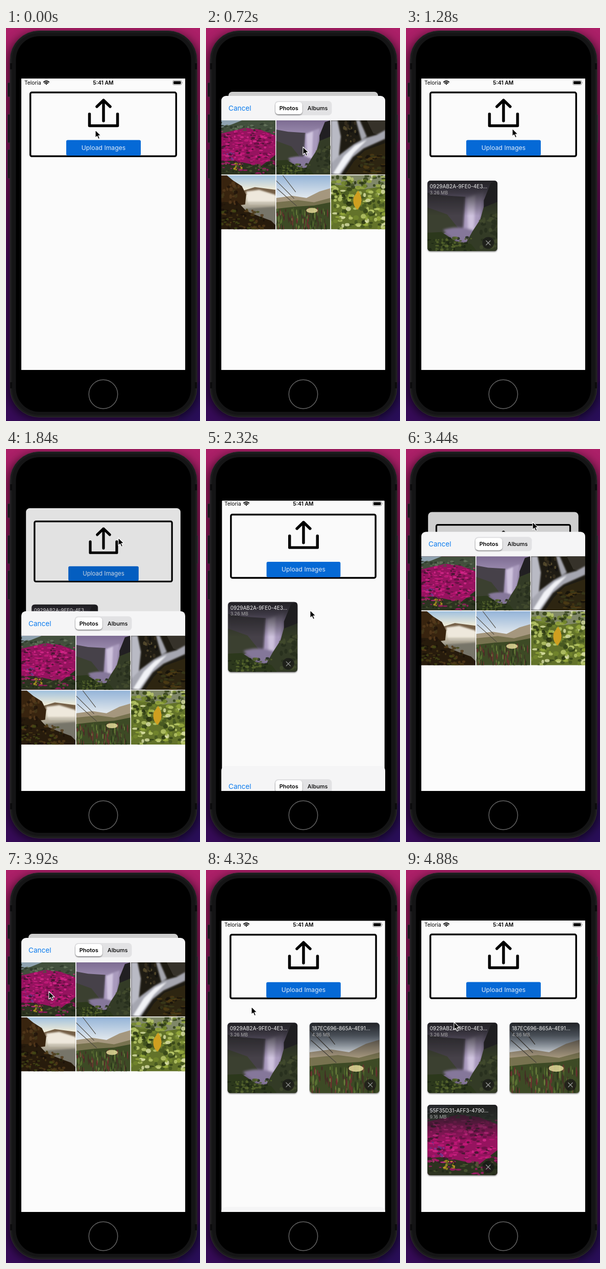
An HTML page that plays this animation: 380 by 770 pixels, repeating every 4960 ms.

```html
<!DOCTYPE html>
<html lang="en">
<head>
<meta charset="utf-8">
<title>Image upload</title>
<style>
  html, body { margin: 0; width: 100%; height: 100%; overflow: hidden; background: #000; }
  svg { display: block; }
  text { font-family: Inter, Roboto, sans-serif; }
  .mid { text-anchor: middle; }
  .line { fill: none; stroke: #000; stroke-linecap: round; stroke-linejoin: round; }
</style>
</head>
<body>
<svg id="stage" width="380" height="770" viewBox="0 0 380 770">
  <defs>
    <linearGradient id="wall" x2="0" y2="1">
      <stop offset="0" stop-color="#ac2068"/>
      <stop offset=".2" stop-color="#98195f"/>
      <stop offset=".42" stop-color="#700f5c"/>
      <stop offset=".6" stop-color="#4b0a62"/>
      <stop offset="1" stop-color="#360b58"/>
    </linearGradient>
    <linearGradient id="shade" x2="0" y2="1">
      <stop offset="0" stop-color="#1d1d1f" stop-opacity=".95"/>
      <stop offset=".18" stop-color="#1d1d1f" stop-opacity=".72"/>
      <stop offset=".5" stop-color="#1d1d1f" stop-opacity="0"/>
    </linearGradient>
    <linearGradient id="sky" x2="0" y2="1">
      <stop offset="0" stop-color="#94b4d8"/>
      <stop offset=".4" stop-color="#dfe6ec"/>
    </linearGradient>
    <linearGradient id="haze" x2="0" y2="1">
      <stop offset="0" stop-color="#9fc0de"/>
      <stop offset=".25" stop-color="#ecead9"/>
      <stop offset=".5" stop-color="#c0b8a4"/>
      <stop offset=".75" stop-color="#77746a"/>
    </linearGradient>
    <linearGradient id="dusk" x2="0" y2="1">
      <stop offset="0" stop-color="#7d6c92"/>
      <stop offset=".2" stop-color="#9484a8"/>
      <stop offset="1" stop-color="#5a5166"/>
    </linearGradient>
    <filter id="soft"><feGaussianBlur stdDeviation="1.5"/></filter>
    <filter id="glow" x="-20%" y="-10%" width="140%" height="120%"><feGaussianBlur stdDeviation="10"/></filter>
    <filter id="drop" x="-10%" y="-10%" width="120%" height="125%">
      <feDropShadow dx="0" dy="1.5" stdDeviation="1.3" flood-opacity=".5"/>
    </filter>
    <clipPath id="screen"><rect x="30" y="99" width="321" height="571"/></clipPath>
    <clipPath id="cardClip"><rect width="137" height="138" rx="6"/></clipPath>

    <symbol id="blooms" viewBox="0 0 100 100">
      <rect width="100" height="100" fill="#96135f"/>
      <path d="M0 0H100V28L72 17 45 14 22 19 0 24Z" fill="#414f3c"/>
      <path d="M0 0H38L18 8 0 13Z" fill="#8fa2b0"/>
      <path d="M0 76L22 74 50 80 74 84 100 64V100H0Z" fill="#2c3320"/>
    </symbol>
    <symbol id="falls" viewBox="0 0 100 100">
      <rect width="100" height="100" fill="url(#dusk)"/>
      <path d="M0 17L22 21 54 23 52 72 0 72Z" fill="#464149"/>
      <path d="M0 38L28 48 44 68 0 82Z" fill="#3b4030"/>
      <g filter="url(#soft)">
        <path d="M54 24L80 15 76 50 68 80H50Z" fill="#a99abd"/>
        <path d="M56 25L68 20 66 70 58 80Z" fill="#cfc3de"/>
        <path d="M22 70Q45 62 70 72L60 90Q35 86 22 70Z" fill="#85779a"/>
      </g>
      <path d="M100 8L90 20 80 37 75 55 64 72 55 88 58 100H100Z" fill="#333b26"/>
      <path d="M100 0L90 3 80 28 80 38 100 30Z" fill="#211f22"/>
      <path d="M0 74L20 73 40 86 62 90 70 100H0Z" fill="#2c381c"/>
    </symbol>
    <symbol id="rapids" viewBox="0 0 100 100">
      <rect width="100" height="100" fill="#1e1b13"/>
      <path d="M66 0H100V30L78 24Z" fill="#36322a"/>
      <g filter="url(#soft)">
        <path d="M0 0H12L18 30 14 70 0 82Z" fill="#b9bac4"/>
        <path d="M100 18L84 27 62 33 42 44 18 62 0 80V100H18L40 68 60 52 100 34Z" fill="#a5a6b0"/>
        <path d="M66 36L44 47 24 66 4 98 14 100 42 60Z" fill="#f1f2f6"/>
        <path d="M46 0L53 0 66 30 56 36Z" fill="#a4a5ae"/>
      </g>
      <path d="M42 76L62 56 100 42V100H26Z" fill="#2d2511"/>
    </symbol>
    <symbol id="basin" viewBox="0 0 100 100">
      <rect width="100" height="100" fill="url(#haze)"/>
      <path d="M42 28L62 22 100 27V38L46 36Z" fill="#756047"/>
      <g filter="url(#soft)">
        <path d="M46 30L70 27 100 36V49H48Z" fill="#eee8dc"/>
        <path d="M48 50H100V54H52Z" fill="#c8c2b4"/>
        <path d="M42 62L100 58V82L60 76Z" fill="#777469"/>
      </g>
      <path d="M0 0H10L22 10 38 20 46 36 44 54 0 60Z" fill="#38240f"/>
      <path d="M0 49L32 51 46 66 70 76 92 84 100 92V100H0Z" fill="#271b0c"/>
    </symbol>
    <symbol id="dunes" viewBox="0 0 100 100">
      <rect width="100" height="100" fill="url(#sky)"/>
      <path d="M0 42L30 38 56 42 80 30 100 24V70H0Z" fill="#a5977e"/>
      <path d="M0 50L40 46 70 50 100 42V70H0Z" fill="#77724f"/>
      <path d="M0 62L35 58 70 56 100 50V100H0Z" fill="#3d4a25"/>
      <path d="M0 10L33 43M2 25L38 57M12 0L36 31" stroke="#4c483f" fill="none"/>
    </symbol>
    <symbol id="leaves" viewBox="0 0 100 100">
      <rect width="100" height="100" fill="#63732a"/>
      <path d="M0 0H100V20L60 26 0 16Z" fill="#808868"/>
    </symbol>
  </defs>

  <rect width="380" height="770" fill="url(#wall)"/>
  <path d="M380 690V770H335Z" fill="#19125a" opacity=".45"/>
  <rect x="6" y="12" width="370" height="752" rx="54" opacity=".75" filter="url(#glow)"/>
  <g fill="#17131a" stroke="#38303a">
    <rect x="3.5" y="107" width="8" height="28" rx="2"/>
    <rect x="3.5" y="169" width="8" height="56" rx="2"/>
    <rect x="3.5" y="238" width="8" height="57" rx="2"/>
    <rect x="367" y="169" width="8.5" height="56" rx="2"/>
  </g>
  <rect x="8" y="5.5" width="366" height="757" rx="57" fill="#1b1b1c" stroke="#302c30"/>
  <path d="M8 75H14M368 75H374M8 700H14M368 700H374" stroke="#0c0c0d" stroke-width="12"/>
  <rect x="12" y="10" width="358" height="748" rx="52" fill="#141415"/>
  <rect x="19.5" y="16" width="343" height="736" rx="46" fill="#000"/>
  <circle cx="190.5" cy="717.5" r="28.2" fill="none" stroke="#636363" stroke-width="1.5"/>

  <g clip-path="url(#screen)">
    <g id="home">
      <rect id="page" x="30" y="99" width="321" height="571" fill="#fbfbfb"/>
      <rect class="line" x="47.7" y="126.3" width="285.6" height="125" rx="3" stroke-width="3.5"/>
      <path class="line" d="M191 182V141.500M178 154L191 141.500 204 154M163.500 168.500V191.500H218.500V168.500" stroke-width="5.5"/>
      <rect x="118" y="219.5" width="146" height="30.5" rx="3" fill="#0569d6"/>
      <text class="mid" x="191" y="239" font-size="12.2" fill="#e3edf9">Upload Images</text>
      <g id="cards"></g>
      <rect id="dim" x="29" y="98" width="323" height="573" opacity="0"/>
    </g>
    <g id="status">
      <text x="36" y="111" font-size="10.3">Teloria</text>
      <text class="mid" x="190.5" y="111.3" font-size="10.4" font-weight="600">5:41 AM</text>
      <g class="line" stroke-width="1.9" style="stroke-linecap:butt">
        <path d="M73.300 106.200Q79 101.200 84.700 106.200M75.300 108.500Q79 105.300 82.700 108.500"/>
        <path d="M77.200 109.500L79 108.400 80.800 109.500 79 111.400Z" fill="#000" stroke="none"/>
      </g>
      <rect x="326.5" y="102.8" width="17.5" height="8.6" rx="2.5" fill="none" stroke="#909090"/>
      <rect x="328" y="104.3" width="14.5" height="5.6" rx="1.3"/>
      <path d="M345.300 105.500Q347 107 345.300 108.700Z" fill="#909090"/>
    </g>
    <g id="sheet">
      <rect x="30" width="321" height="620" rx="9" fill="#f5f5f6"/>
      <g id="content">
        <rect x="30" y="48" width="321" height="560" fill="#fcfcfc"/>
        <text x="44" y="29" font-size="13.6" fill="#0b7bee">Cancel</text>
        <rect x="134.5" y="10" width="112" height="28" rx="7" fill="#e2e2e4"/>
        <rect x="136" y="12" width="52.5" height="24" rx="6" fill="#fff" filter="url(#drop)"/>
        <text class="mid" x="162.3" y="28" font-size="11" font-weight="600">Photos</text>
        <text class="mid" x="218.7" y="28" font-size="11" font-weight="500">Albums</text>
        <g id="grid"></g>
      </g>
    </g>
  </g>
  <path id="cursor" d="M0 0V15L3.500 11.800 6 17.500 8.500 16.400 6.100 10.900H11Z" fill="#000" stroke="#fff" stroke-width="1.1" stroke-linejoin="round"/>
</svg>

<script>
const NS = 'http://www.w3.org/2000/svg';
const $ = id => document.getElementById(id);
function add(parent, tag, attrs, text) {
  const node = document.createElementNS(NS, tag);
  for (const key in attrs) node.setAttribute(key, attrs[key]);
  if (text) node.textContent = text;
  return parent.appendChild(node);
}

// Seeded dabs of colour inside a box
let seed = 11;
const rand = () => (seed = seed * 16807 % 2147483647) / 2147483647;
function dabs(photo, count, [x, y, w, h], [rx, ry], colours) {
  for (let i = 0; i < count; i++) {
    add($(photo), 'ellipse', {
      cx: (x + rand() * w).toFixed(1), cy: (y + rand() * h).toFixed(1),
      rx: (rx * (.5 + rand())).toFixed(1), ry: (ry * (.5 + rand())).toFixed(1),
      fill: colours[Math.floor(rand() * colours.length)], opacity: .8
    });
  }
}
dabs('blooms', 45, [0, 4, 100, 15], [2.5, 1.5], ['#2b3628', '#66755e', '#4a5540']);
dabs('blooms', 230, [0, 20, 100, 62], [3, 1.4], ['#cb1a7d', '#b81672', '#d82a8c', '#6a0f45', '#37192a']);
dabs('blooms', 45, [0, 80, 100, 20], [3, 1.5], ['#a5176a', '#1d2716', '#4d5a33']);
dabs('blooms', 16, [22, 79, 16, 12], [1.8, 1.4], ['#d9b528', '#a48c20']);
dabs('blooms', 14, [3, 52, 20, 22], [1.3, 1.3], ['#7a3c9c', '#5f3a86']);
dabs('falls', 60, [0, 80, 62, 20], [2, 1.5], ['#4a5a28', '#1c2613', '#5a6a2e']);
dabs('falls', 30, [76, 48, 24, 52], [3, 3], ['#434b2d', '#262d1c']);
dabs('rapids', 45, [52, 64, 48, 36], [4, 2], ['#4d3b14', '#15120b', '#38391a']);
dabs('rapids', 22, [22, 4, 26, 36], [2, 3], ['#3a3120', '#13120f', '#5a4f30']);
dabs('basin', 80, [0, 64, 80, 36], [3, 2], ['#4a3a16', '#181109', '#434816', '#533a1a']);
dabs('basin', 30, [0, 14, 36, 42], [2.5, 3], ['#553a1c', '#21140a', '#45381a']);
dabs('dunes', 120, [0, 64, 100, 36], [.9, 5], ['#5b7632', '#27361a', '#762c32', '#71863f', '#452826']);
dabs('dunes', 1, [66, 65, 0, 0], [8, 4], ['#eee3a0']);
dabs('leaves', 200, [0, 0, 100, 100], [4, 3], ['#98ac3c', '#222e10', '#435420', '#bccb6c', '#74882e', '#dbe2a8', '#303f16']);
add($('leaves'), 'path', { d: 'M50 28Q59 42 55 54L49 64Q38 54 42 40Z', fill: '#cf9f20' });

['blooms', 'falls', 'rapids', 'basin', 'dunes', 'leaves'].forEach((photo, i) => {
  add($('grid'), 'use', {
    href: '#' + photo, x: 30 + i % 3 * 107.5, y: 48 + Math.floor(i / 3) * 107.5, width: 106, height: 106
  });
});

const cards = [
  { at: 1120, x: 42, y: 299, photo: 'falls', name: '0929AB2A-9FE0-4E3…', size: '3.26 MB' },
  { at: 2400, x: 203, y: 299, photo: 'dunes', name: '187EC696-865A-4E91…', size: '4.36 MB' },
  { at: 4400, x: 42, y: 460, photo: 'blooms', name: '55F35D31-AFF3-4790…', size: '9.16 MB' }
].map(card => {
  const node = add($('cards'), 'g', { transform: `translate(${card.x} ${card.y})` });
  add(node, 'rect', { width: 137, height: 138, rx: 6, fill: '#222', filter: 'url(#drop)' });
  const face = add(node, 'g', { 'clip-path': 'url(#cardClip)' });
  add(face, 'use', { href: '#' + card.photo, width: 138, height: 138 });
  add(face, 'rect', { width: 138, height: 138, fill: 'url(#shade)' });
  add(node, 'text', { x: 4.5, y: 15, 'font-size': 10.1, fill: '#f0f0f0' }, card.name);
  add(node, 'text', { x: 4.5, y: 26.5, 'font-size': 9, fill: '#a8a8a8' }, card.size);
  add(node, 'circle', { cx: 119, cy: 122, r: 11.5, fill: '#161616', 'fill-opacity': .72 });
  add(node, 'path', { d: 'M114.500 117.500l9 9m0-9l-9 9', stroke: '#a0a0a0', 'stroke-width': 1.1 });
  return { at: card.at, node };
});

const LOOP = 4960, STEP = 80;
// Open and close time of the sheet
const sheets = [[320, 830], [1738, 2138], [3229, 4050]];
// Time, x, y of the pointer tip
const path = [
  [0, 175, 200], [320, 175, 200], [680, 190, 233], [960, 190, 233], [1520, 220, 174],
  [1840, 220, 174], [2080, 204, 316], [2320, 204, 316], [3040, 248, 143], [3440, 248, 143],
  [3840, 84, 238], [4080, 84, 238], [4560, 94, 298], [LOOP, 94, 298]
];

const clamp = v => Math.max(0, Math.min(1, v));
function spring(ms) {
  const k = Math.max(0, ms) * .022;
  return 1 - (1 + k) * Math.exp(-k);
}
function sheetLevel(t) {
  const level = sheets.reduce((sum, [open, close]) => sum + spring(t - open) - spring(t - close), 0);
  return level < .004 ? 0 : level > .996 ? 1 : level;
}
function pointer(t) {
  const i = path.findIndex(p => p[0] > t);
  const [t0, x0, y0] = path[i - 1], [t1, x1, y1] = path[i];
  const u = (t - t0) / (t1 - t0), e = u * u * (3 - 2 * u);
  return [x0 + (x1 - x0) * e, y0 + (y1 - y0) * e];
}

function draw(t) {
  const p = sheetLevel(t), scale = 1 - .087 * p;
  const closing = sheets.some(([, close]) => t > close && t < close + 600);
  const corner = Math.min(8, p * 12);
  $('home').setAttribute('transform',
    `translate(190.5 ${99 + 26 * p}) scale(${scale}) translate(-190.5 -99)`);
  $('page').setAttribute('rx', corner);
  $('dim').setAttribute('rx', corner);
  $('dim').setAttribute('opacity', .19 * p ** 1.5);
  $('status').setAttribute('visibility', p > .5 ? 'hidden' : 'visible');
  $('sheet').setAttribute('transform', `translate(0 ${670 - 537 * p})`);
  $('sheet').setAttribute('visibility', p ? 'visible' : 'hidden');
  // The header gains the status bar inset on its way out
  $('content').setAttribute('transform', `translate(0 ${closing ? 16 : 0})`);
  for (const { at, node } of cards) node.setAttribute('opacity', clamp((t - at + STEP) / 240));
  $('cursor').setAttribute('transform', `translate(${pointer(t)})`);
}

const start = performance.now();
function tick() {
  const t = (performance.now() - start) % LOOP;
  draw(Math.floor(t / STEP) * STEP);
  requestAnimationFrame(tick);
}
tick();
</script>
</body>
</html>
```
